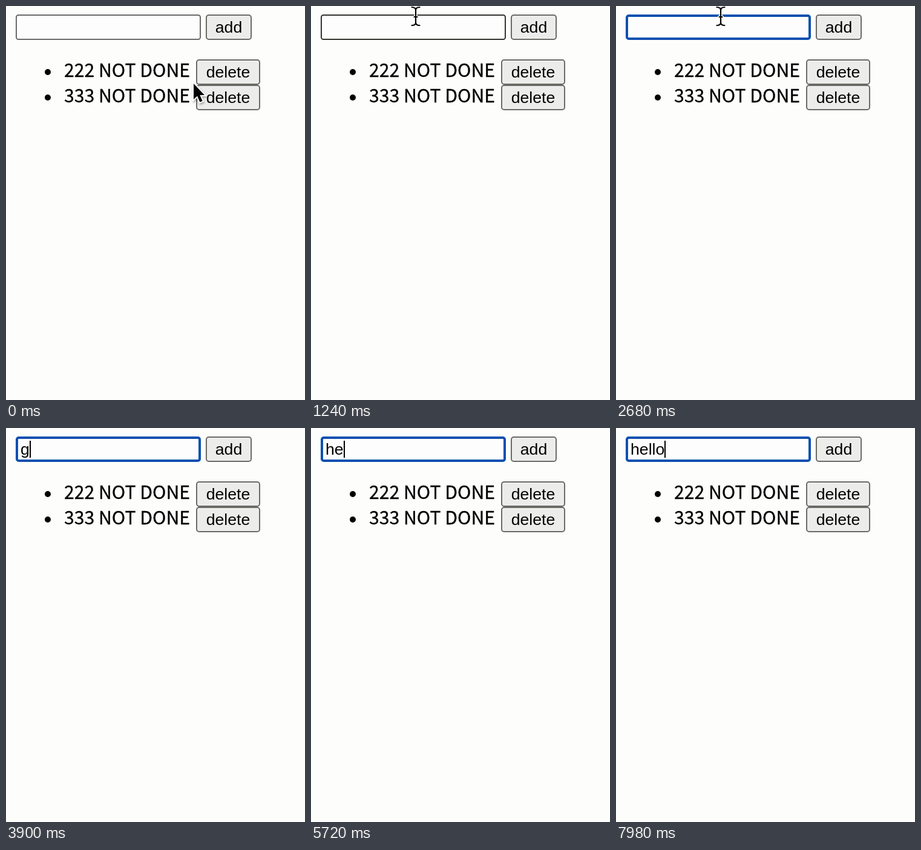
Recreate the animation shown at these times as an HTML page. Size 494 px wide and 650 px high, loop 8000 ms.

```html
<!DOCTYPE html>
<html lang="en">
<head>
<meta charset="utf-8">
<title>Todo list</title>
<style>
  html, body { margin: 0; width: 100%; height: 100%; overflow: hidden; background: #fdfdfc; }
  svg { display: block; width: 494px; height: 650px; }
  text { font: 26.67px "Liberation Sans", Arial, sans-serif; }
  .item { font: 30.2px "Noto Sans CJK JP", "Noto Sans CJK SC", "Noto Sans", sans-serif; stroke: #000; stroke-width: .3; }
  .button rect { fill: #ececeb; stroke: #6b6b66; stroke-width: 2; }
  .button text { text-anchor: middle; }
</style>
</head>
<body>
<svg viewBox="0 0 494 650">
  <defs>
    <path id="beamShape" d="M-6.5-15Q0-15 0-10Q0-15 6.5-15M0-10V10M-6.5 15Q0 15 0 10Q0 15 6.5 15M-2.5 1H2.5"/>
  </defs>
  <rect id="field" fill="#fdfdfd"/>
  <text id="value" x="24" y="44"></text>
  <rect id="caret" y="21" width="2" height="28"/>
  <g id="controls"></g>
  <g id="pointer">
    <path id="arrow" d="M0 0V26L6 20.5L10.3 30.5L14.6 28.7L10.3 19H18Z" stroke="#fff" stroke-width="4"
      style="paint-order:stroke;filter:drop-shadow(1px 2px 1.5px #0005)"/>
    <g id="beam" fill="none" stroke-linecap="round">
      <use href="#beamShape" stroke="#fff" stroke-width="5"/>
      <use href="#beamShape" stroke="#000" stroke-width="2.2"/>
    </g>
  </g>
</svg>
<script>
const LOOP = 8000, FOCUS = 2600, CARET = 2780, POINTER_HIDDEN = 3200;
const typing = [[0, ""], [3600, "g"], [4400, ""], [4640, "h"], [5360, "he"],
  [5960, "hel"], [6480, "hell"], [7420, "hello"]];
const route = [[0, 310, 128], [420, 191, 32], [540, 191, 32], [820, 173, 17]];
const el = id => document.getElementById(id);

function button(x, y, width, label) {
  return `<g class="button"><rect x="${x + 1}" y="${y + 1}" width="${width - 2}" height="40" rx="4"/>
    <text x="${x + width / 2}" y="${y + 30}">${label}</text></g>`;
}

function item(y, label) {
  return `<circle cx="69" cy="${y + 21}" r="5"/>
    <text class="item" x="96" y="${y + 29}">${label} NOT DONE</text>${button(314, y, 106, "delete")}`;
}

el("controls").innerHTML = button(330, 14, 76, "add") + item(88, "222") + item(130, "333");

function pointerAt(t) {
  const next = route.findIndex(p => p[0] > t);
  if (next < 0) return route.at(-1).slice(1);
  const [t0, x0, y0] = route[next - 1], [t1, x1, y1] = route[next];
  const u = (t - t0) / (t1 - t0), k = u * u * (3 - 2 * u);
  return [x0 + (x1 - x0) * k, y0 + (y1 - y0) * k];
}

function drawField(focused, hovered) {
  const inset = focused ? 2 : 1;
  const attributes = {
    x: 16 + inset, y: 14 + inset, width: 306 - 2 * inset, height: 42 - 2 * inset,
    rx: 4 - inset / 2, "stroke-width": 2 * inset,
    stroke: focused ? "#0a50b0" : hovered ? "#333330" : "#6b6b6b"
  };
  for (const name in attributes) el("field").setAttribute(name, attributes[name]);
}

function render(t) {
  const [x, y] = pointerAt(t);
  const overField = y < 56;
  const overText = x < 305 && y > 88;
  el("pointer").setAttribute("transform", `translate(${x} ${y})`);
  el("pointer").style.display = t < POINTER_HIDDEN ? "" : "none";
  el("arrow").style.display = overField || overText ? "none" : "";
  el("beam").style.display = overField || overText ? "" : "none";
  drawField(t >= FOCUS, overField);

  el("value").textContent = typing.findLast(step => step[0] <= t)[1];
  el("caret").setAttribute("x", Math.round(24 + el("value").getComputedTextLength()));
  el("caret").style.display = t >= CARET ? "" : "none";
}

const start = performance.now();
function tick() {
  render((performance.now() - start) % LOOP);
  requestAnimationFrame(tick);
}
tick();
</script>
</body>
</html>
```
